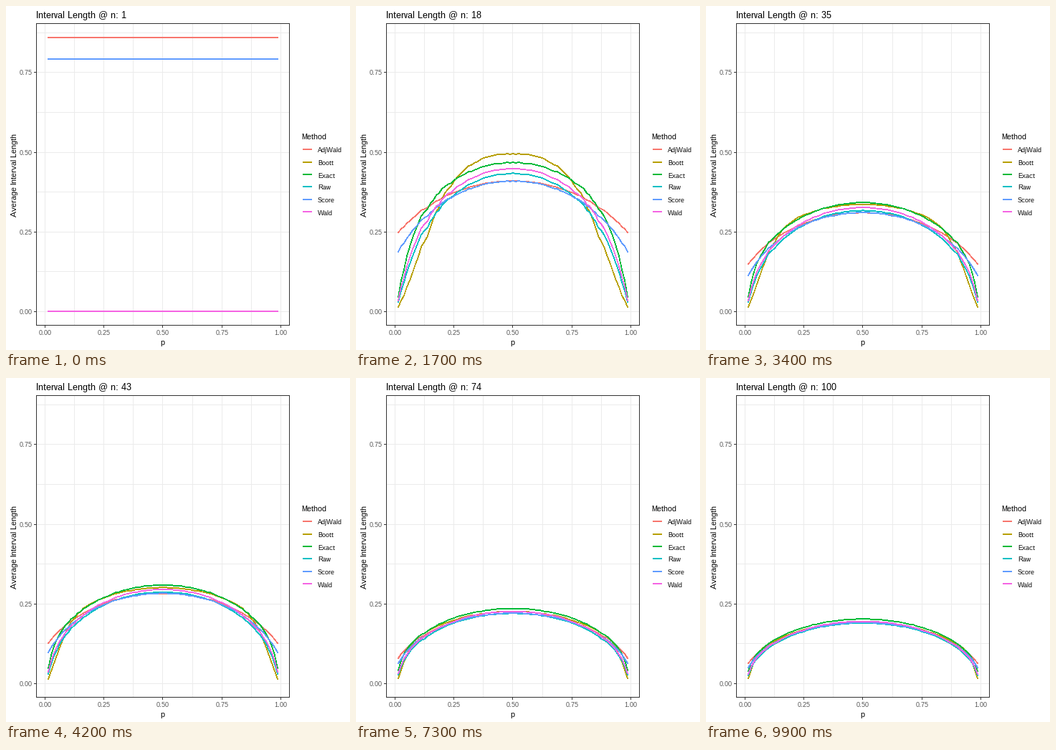
A matplotlib script that plays this animation: 480x480 px, repeating every 10000 ms.

```python
import numpy as np
import matplotlib.pyplot as plt
from matplotlib.animation import FuncAnimation

plt.rcParams.update({
    "font.family": "Liberation Sans",
    "text.hinting": "native",
    "text.hinting_factor": 1,
})

METHODS = ["AdjWald", "Boott", "Exact", "Raw", "Score", "Wald"]
COLORS = ["#F8766D", "#B79F00", "#00BA38", "#00BFC4", "#619CFF", "#F564E3"]
Z = 1.96
BOOT = 200      # bootstrap resamples
SIMS = 1500     # simulated samples per p
N_MAX = 100
P_SHOWN = np.linspace(0.0125, 0.9875, 79)
P_DRAWN = np.linspace(0.01, 0.99, 79)

log_fact = np.concatenate([[0], np.cumsum(np.log(np.arange(1, BOOT + 1)))])


def pmf(n, p):
    """Binomial probabilities, one row per p."""
    j = np.arange(n + 1)
    p = np.clip(np.asarray(p, float), 1e-12, 1 - 1e-12)[:, None]
    comb = log_fact[n] - log_fact[j] - log_fact[n - j]
    return np.exp(comb + j * np.log(p) + (n - j) * np.log1p(-p))


def upper_tail(prob):
    return np.cumsum(prob[:, ::-1], axis=1)[:, ::-1]


# Chance that a sample quantile of BOOT draws lies below a point with given CDF
F_GRID = np.linspace(0, 1, 2001)
BOOT_TAIL = upper_tail(pmf(BOOT, F_GRID))


def below_quantile(q):
    pos = 1 + (BOOT - 1) * q
    k = int(pos)
    w = pos - k
    return (1 - w) * BOOT_TAIL[:, k] + w * BOOT_TAIL[:, k + 1]


LOW, HIGH = below_quantile(0.025), below_quantile(0.975)


def quantile_gap(values, prob):
    """Expected distance between the 2.5% and 97.5% bootstrap quantiles."""
    cdf = np.minimum(np.cumsum(prob, axis=1), 1)
    cdf[:, -1] = 1
    weight = np.interp(cdf, F_GRID, HIGH) - np.interp(cdf, F_GRID, LOW)
    return (values * np.diff(weight, axis=1, prepend=0)).sum(axis=1)


def exact_length(n):
    x = np.arange(1, n)
    lo, hi = np.zeros(n - 1), np.ones(n - 1)
    for _ in range(18):
        mid = (lo + hi) / 2
        small = upper_tail(pmf(n, mid))[x - 1, x] < 0.025
        lo, hi = np.where(small, mid, lo), np.where(small, hi, mid)
    return 1 - lo[::-1] - lo


def lengths(n):
    """Interval length of each method for every count 0..n."""
    x = np.arange(n + 1)
    ph = x / n
    se = np.sqrt(ph * (1 - ph) / n)
    adj = (x + 2) / (n + 4)
    out = np.zeros((6, n + 1))
    out[0] = 2 * Z * np.sqrt(adj * (1 - adj) / (n + 4))
    out[4] = 2 * Z / (n + Z**2) * np.sqrt(n * ph * (1 - ph) + Z**2 / 4)
    out[5] = 2 * Z * se
    if n > 1:
        inner = slice(1, -1)
        prob = pmf(n, ph[inner])
        kept = prob[:, inner] / prob[:, inner].sum(axis=1, keepdims=True)
        t = (ph[inner] - ph[inner, None]) / se[inner]
        out[1, inner] = quantile_gap(t, kept) * se[inner]
        out[2, inner] = exact_length(n)
        out[3, inner] = quantile_gap(ph, prob)
    return out


def mean_lengths(n):
    rng = np.random.default_rng(n)
    half = len(P_DRAWN) // 2 + 1
    prob = pmf(n, P_DRAWN[:half])
    prob /= prob.sum(axis=1, keepdims=True)
    share = np.array([rng.multinomial(SIMS, row) for row in prob]) / SIMS
    left = lengths(n) @ share.T
    return np.hstack([left, left[:, -2::-1]])


def px(p):
    return 54.4 + 329.1 * p


def py(v):
    return 426.4 - 444.7 * v


CURVES = [np.round(py(mean_lengths(n))) for n in range(1, N_MAX + 1)]

fig = plt.figure(figsize=(480 / 72, 480 / 72), dpi=72, facecolor="white")
ax = fig.add_axes([0, 0, 1, 1])
ax.set(xlim=(0, 480), ylim=(480, 0))
ax.axis("off")


def line(xs, ys, color):
    """Hard-edged line: 1 px wide on pixel centres, 2 px on pixel edges."""
    return ax.plot(xs, ys, color=color, lw=0.6, antialiased=False, snap=False,
                   solid_capstyle="projecting", solid_joinstyle="round")[0]


def label(x, y, s, size, color="black", **kw):
    return ax.text(x, y, s, size=size, color=color, va="baseline",
                   rotation_mode="anchor", **kw)


LEFT, RIGHT, TOP, BOTTOM = 42.5, 395.5, 24.5, 445.5
GRID, DARK, GREY = "#EBEBEB", "#333333", "#4D4D4D"

for i in range(9):
    gx = np.floor(px(i / 8)) + 0.5
    line([gx, gx], [TOP, BOTTOM], GRID)
    if i < 8:
        gy = np.floor(py(i / 8)) + 0.5
        line([LEFT, RIGHT], [gy, gy], GRID)
    if i % 2 == 0:
        line([gx, gx], [BOTTOM, BOTTOM + 3], DARK)
        label(gx, 459, f"{i / 8:.2f}", 9, GREY, ha="center")
        if i < 8:
            line([LEFT - 3, LEFT], [gy, gy], DARK)
            label(37, gy + 3.5, f"{i / 8:.2f}", 9, GREY, ha="right")

curves = [line(np.round(px(P_SHOWN)), CURVES[0][i], c)
          for i, c in enumerate(COLORS)]
line([LEFT, RIGHT, RIGHT, LEFT, LEFT], [TOP, TOP, BOTTOM, BOTTOM, TOP], DARK)

title = label(42, 17, "", 13)
label(218, 473, "p", 11, ha="center")
label(15, 235.5, "Average Interval Length", 11, ha="center", rotation=90)
label(412, 186, "Method", 11)
for i, (name, color) in enumerate(zip(METHODS, COLORS)):
    y = round(200.4 + 17.28 * i)
    line([414.5, 426.5], [y, y], color)
    label(435, y + 4.5, name, 9)


def update(i):
    title.set_text(f"Interval Length @ n: {i + 1}")
    for curve, ys in zip(curves, CURVES[i]):
        curve.set_ydata(ys)
    return [title, *curves]


anim = FuncAnimation(fig, update, frames=N_MAX, interval=100,
                     repeat=True, repeat_delay=0, blit=False)
plt.show()
```
